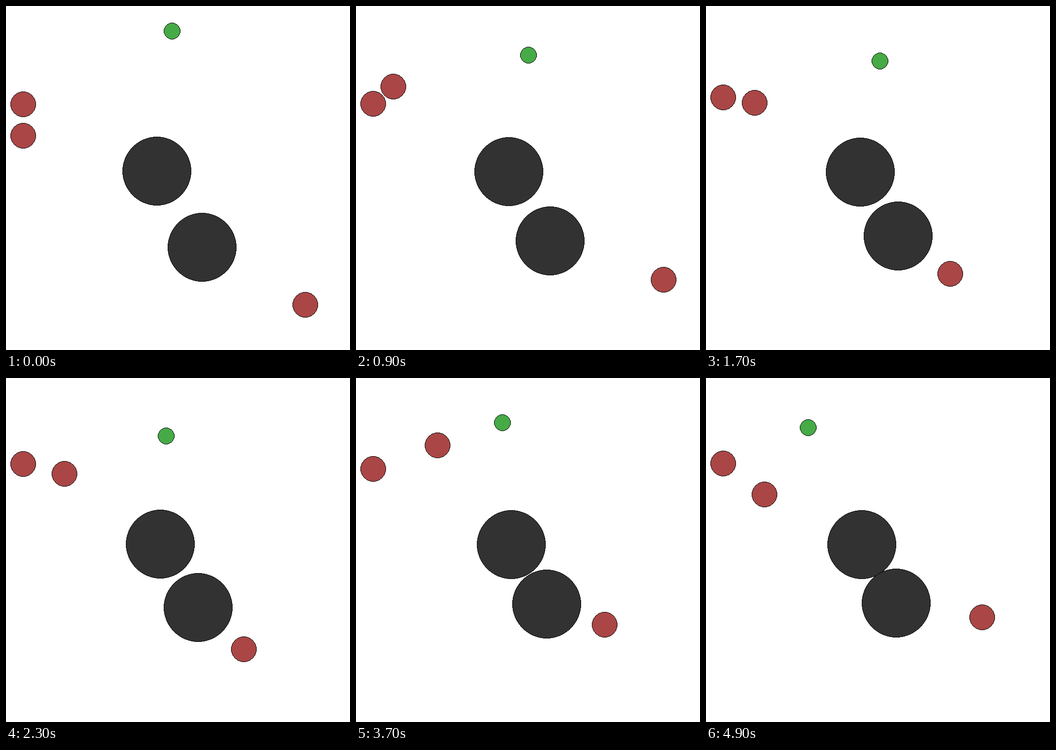
Animation of 700x700 px, one loop 5000 ms. Source, as an HTML page with a canvas:

```html
<!DOCTYPE html>
<html lang="en">
<head>
<meta charset="utf-8">
<title>Pursuit</title>
<style>
  html, body { margin: 0; width: 100%; height: 100%; overflow: hidden; background: #fff; }
  canvas { display: block; width: 100vw; height: 100vh; image-rendering: pixelated; }
</style>
</head>
<body>
<canvas id="stage" width="700" height="700"></canvas>
<script>
const STEP = 100, STEPS = 50, MID = 350, REACH = 315;
const RED = "#aa4646", GREEN = "#46aa46", GREY = "#323232";
const ctx = document.getElementById("stage").getContext("2d");

// Waypoints in world space, measured from the middle: [step, x, y].
const movers = [
  { color: RED, r: 26, path: [
    [0, -315, -150], [9, -301, -204], [17, -299, -182], [29, -251, -196],
    [37, -235, -273], [42, -269, -240], [49, -301, -147]] },
  { color: RED, r: 26, path: [
    [0, -315, -86], [9, -347, -166], [17, -376, -195], [29, -383, -218],
    [37, -404, -211], [42, -373, -190], [49, -412, -230]] },
  { color: RED, r: 26, path: [
    [0, 259, 258], [6, 332, 249], [9, 305, 229], [17, 176, 233],
    [29, 157, 252], [37, 201, 196], [42, 218, 144], [49, 278, 180]] },
  { color: GREEN, r: 17, path: [
    [0, -12, -299], [3, -5, -330], [9, 2, -275], [17, 5, -283], [22, -22, -276],
    [29, -63, -360], [33, -65, -404], [37, -66, -332], [42, -158, -289], [49, -185, -325]] }
];
const rocks = [[-42.6, -13.3], [49.6, 141.5]];

// Smooth curve through the waypoints on one axis, without overshoot.
function along(path, axis, t) {
  const slope = i => (path[i + 1][axis] - path[i][axis]) / (path[i + 1][0] - path[i][0]);
  const last = path.length - 1;
  const tangent = i => {
    const a = slope(Math.max(i - 1, 0)), b = slope(Math.min(i, last - 1));
    return a * b > 0 ? 2 * a * b / (a + b) : 0;
  };
  let i = 0;
  while (i < last - 1 && t >= path[i + 1][0]) i++;
  const a = path[i], b = path[i + 1], h = b[0] - a[0];
  const u = (t - a[0]) / h, w = 1 - u;
  return a[axis] * w * w * (1 + 2 * u) + b[axis] * u * u * (3 - 2 * u)
    + h * u * w * (tangent(i) * w - tangent(i + 1) * u);
}

// Midpoint circle with hard pixel edges and a one-pixel outline.
function disc(cx, cy, r, color) {
  const spans = [];
  let f = 1 - r, y = r;
  for (let x = 0; x < y;) {
    if (f >= 0) f -= 2 * --y;
    f += 2 * ++x + 1;
    spans.push([x, y], [y, x]);
  }
  ctx.fillStyle = color;
  for (const [x, y] of spans) ctx.fillRect(cx - x, cy - y, 2 * x, 2 * y);
  ctx.fillStyle = "#000";
  for (const [x, y] of spans)
    for (const px of [cx - x, cx + x - 1])
      for (const py of [cy - y, cy + y - 1]) ctx.fillRect(px, py, 1, 1);
}

function draw(t) {
  const spots = movers.map(m => [along(m.path, 1, t), along(m.path, 2, t)]);
  // The camera zooms so that the farthest mover touches the edge of its reach.
  const zoom = REACH / Math.max(...spots.flat().map(Math.abs));
  const toStage = v => Math.floor(MID + v * zoom + 1e-6);
  const put = ([x, y], r, color) => disc(toStage(x), toStage(y), r, color);

  ctx.clearRect(0, 0, 700, 700);
  movers.forEach((m, i) => put(spots[i], m.r, m.color));
  rocks.forEach(spot => put(spot, 70, GREY));
}

let start = null, shown = -1;
function tick(now) {
  start ??= now;
  const step = Math.floor(Math.max(0, now - start) / STEP) % STEPS;
  if (step !== shown) draw(shown = step);
  requestAnimationFrame(tick);
}
draw(0);
requestAnimationFrame(tick);
</script>
</body>
</html>
```
